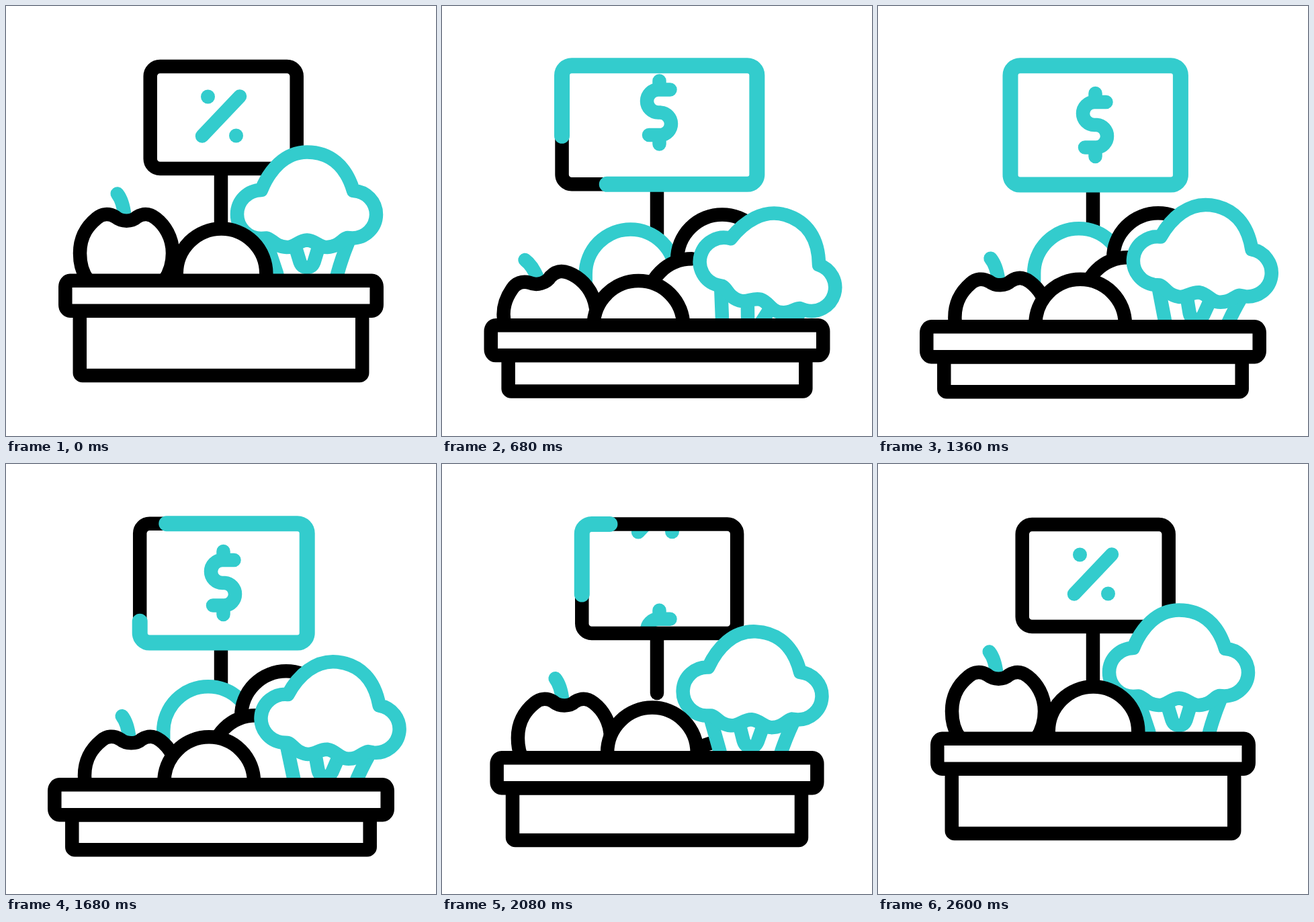
Animation, 640 px wide and 640 px high, one loop 3 s. Source, as an HTML page:

```html
<!DOCTYPE html>
<html lang="en">
<head>
<meta charset="utf-8">
<title>Market scale</title>
<style>
  html, body { margin: 0; width: 100%; height: 100%; overflow: hidden; background: #fff; }
  svg { display: block; width: 100vw; height: 100vh; }
  .ink, .teal { fill: #fff; stroke-width: 20.5; stroke-linecap: round; stroke-linejoin: round; }
  .ink { stroke: #000; }
  .teal { stroke: #33cccd; }
  .open { fill: none; }
  .dot { fill: #33cccd; }
</style>
</head>
<body>
<svg viewBox="0 0 640 640">
  <clipPath id="clip"><path id="clipShape"/></clipPath>
  <clipPath id="above"><rect id="aboveTray" width="640"/></clipPath>

  <path class="ink open" d="M320 235V341"/>
  <path id="screen" class="ink" style="stroke:none"/>
  <g clip-path="url(#clip)">
    <g id="percent">
      <circle class="dot" cx="300.5" cy="135" r="10.5"/>
      <circle class="dot" cx="342.5" cy="193" r="10.5"/>
      <path class="teal open" d="M292 193.5L348 134.5"/>
    </g>
    <path id="dollar" class="teal open" d="M339.5 143H322A17 17 0 0 0 322 177H325.5A16.8 16.8 0 0 1 325.5 210.5H308M323.5 130V143M323.5 211V224"/>
  </g>
  <path id="frame" class="ink open"/>
  <path id="worm" class="teal open" pathLength="1" style="stroke-width:23"/>

  <g clip-path="url(#above)">
    <path id="back" class="teal"/>
    <path id="right" class="ink"/>
    <path id="midFill" class="ink" style="stroke:none"/>
    <path id="mid" class="ink open"/>

    <g id="broccoli">
      <path class="teal" d="M387 350L403 398L406 414H489.5L493.5 398Q499 377 510 350"/>
      <path class="teal open" d="M430.500 358L437.500 381Q440.500 389 448 389Q455.500 389 458.500 381L465.500 358"/>
      <path class="teal" d="M380 274C392 244 415 217.500 448 217.500C482 217.500 506 238 517 275A35.500 35.500 0 0 1 551 310.500A35.500 35.500 0 0 1 515.500 345.500L508 345C500 347 496 358 478 359C466 359 460 349 448 348.500C436 349 430 359 418 359C400 358 396 347 388 345.500L380 346A35.500 35.500 0 0 1 380 274Z"/>
    </g>

    <g id="apple">
      <path class="teal open" d="M165.7 279.5Q174 290 176.5 312"/>
      <path class="ink" d="M122 408C112 395 110 380 110 368C110 340 124 325 135 316C143 309 153 308 163 314C172 321.5 187 321.5 195 314C205 308 214 309 223 316C236 326 248 344 248 368C248 382 245 395 236 408"/>
    </g>

    <path id="dome" class="ink"/>
  </g>
  <rect id="base" class="ink" rx="4"/>
  <rect id="tray" class="ink" rx="7" ry="9" height="44.9"/>
</svg>
<script>
const LOOP = 3000, STEP = 40, R = 66.8;
const el = {};
document.querySelectorAll('[id]').forEach(n => el[n.id] = n);

const set = (node, attrs) => { for (const k in attrs) node.setAttribute(k, attrs[k]); };
const mix = (a, b, k) => a + (b - a) * k;

// Bezier easing with handles (x1, 0) and (x2, 1)
function bezier(x1, x2) {
  return x => {
    if (x <= 0) return 0;
    if (x >= 1) return 1;
    let lo = 0, hi = 1;
    for (let i = 0; i < 24; i++) {
      const s = (lo + hi) / 2, r = 1 - s;
      if (3 * x1 * s * r * r + 3 * x2 * s * s * r + s * s * s < x) lo = s; else hi = s;
    }
    return lo * lo * (3 - 2 * lo);
  };
}
const drop = bezier(.53, .34), settle = bezier(.443, .153), soft = bezier(.42, .58);
const span = (ease, t, from, to) => ease((t - from) / (to - from));

const domePath = (x, y) =>
  `M${x - R} ${y + 40}V${y}A${R} ${R} 0 0 1 ${x + R} ${y}V${y + 40}`;

// Rounded box, drawn from the lower left corner along the bottom
const boxPath = (l, t, r, b, c = 14.5) => {
  const arc = (x, y) => `A${c} ${c} 0 0 0 ${x} ${y}`;
  return `M${l} ${b - c}${arc(l + c, b)}H${r - c}${arc(r, b - c)}V${t + c}` +
         `${arc(r - c, t)}H${l + c}${arc(l, t + c)}Z`;
};

function drawMonitor(t, p, q) {
  const half = 109 + p * mix(37.3, 15.5, q);
  const d = boxPath(323.7 - half, 90 - 1.3 * p, 323.7 + half, 242 + 24 * p);
  for (const k of ['clipShape', 'screen', 'frame', 'worm']) set(el[k], { d });

  let len, start;
  if (t < 1300) {
    len = span(soft, t, 192, 856);
    start = -.004 + (t - 360) * .00027;
  } else {
    len = 1 - span(soft, t, 1342, 2392);
    start = .871 + (t - 1920) * .00045 - len;
  }
  el.worm.style.display = len > .001 ? '' : 'none';
  set(el.worm, {
    'stroke-dasharray': len > .999 ? 'none' : `${len} ${1 - len}`,
    'stroke-dashoffset': -start
  });

  const travel = 180;
  let py, dy;
  if (t < 1300) {
    py = travel * span(soft, t, 175, 825);
    dy = py - travel;
  } else {
    dy = travel * span(soft, t, 1799, 2369);
    py = dy - travel;
  }
  set(el.percent, { transform: `translate(0 ${py})` });
  set(el.dollar, { transform: `translate(0 ${dy})` });
}

function draw(t) {
  const p = t < 1300 ? span(drop, t, 90, 810) : 1 - span(settle, t, 1760, 2600);
  const q = span(settle, t, 810, 1700);
  const rise = t < 1300 ? span(drop, t, 120, 760) : 1 - span(soft, t, 1755, 2305);
  const pose = (hit, rest) => p * mix(hit, rest, q);

  drawMonitor(t, p, q);

  set(el.back, { d: domePath(mix(280, mix(280.5, 301, q), rise), 493 - 95 * rise) });
  set(el.right, { d: domePath(417, 536 - 161 * rise) });
  const my = 596 - 155 * rise;
  set(el.midFill, { d: domePath(372, my) });
  set(el.mid, { d: `M${372 - R} ${my}A${R} ${R} 0 0 1 372 ${my - R}` });

  set(el.broccoli, { transform:
    `translate(${pose(38, 35)} ${pose(92.5, 76.5)}) rotate(${pose(16.7, 6.5)} 448 310.5)` });
  set(el.apple, { transform:
    `translate(${pose(-32.5, 7)} ${pose(96, 95.7)}) rotate(${pose(-16.5, 0)} 179.5 320)` });
  set(el.dome, { d: domePath(320.5 + pose(-29, -18.3), 398.3 + pose(80, 74.8)) });

  const ty = 408.8 + 68.5 * p, by = ty + 44.9;
  set(el.aboveTray, { height: ty });
  set(el.tray, { x: 88.3 - 16 * p, y: ty, width: 463.4 + 32 * p });
  set(el.base, { x: 109.8 - 11.5 * p, y: by, width: 420.4 + 23 * p, height: 549.9 + 24.3 * p - by });
}

const begin = performance.now();
function tick() {
  const t = (performance.now() - begin) % LOOP;
  draw(Math.floor(t / STEP) * STEP);
  requestAnimationFrame(tick);
}
tick();
</script>
</body>
</html>
```
